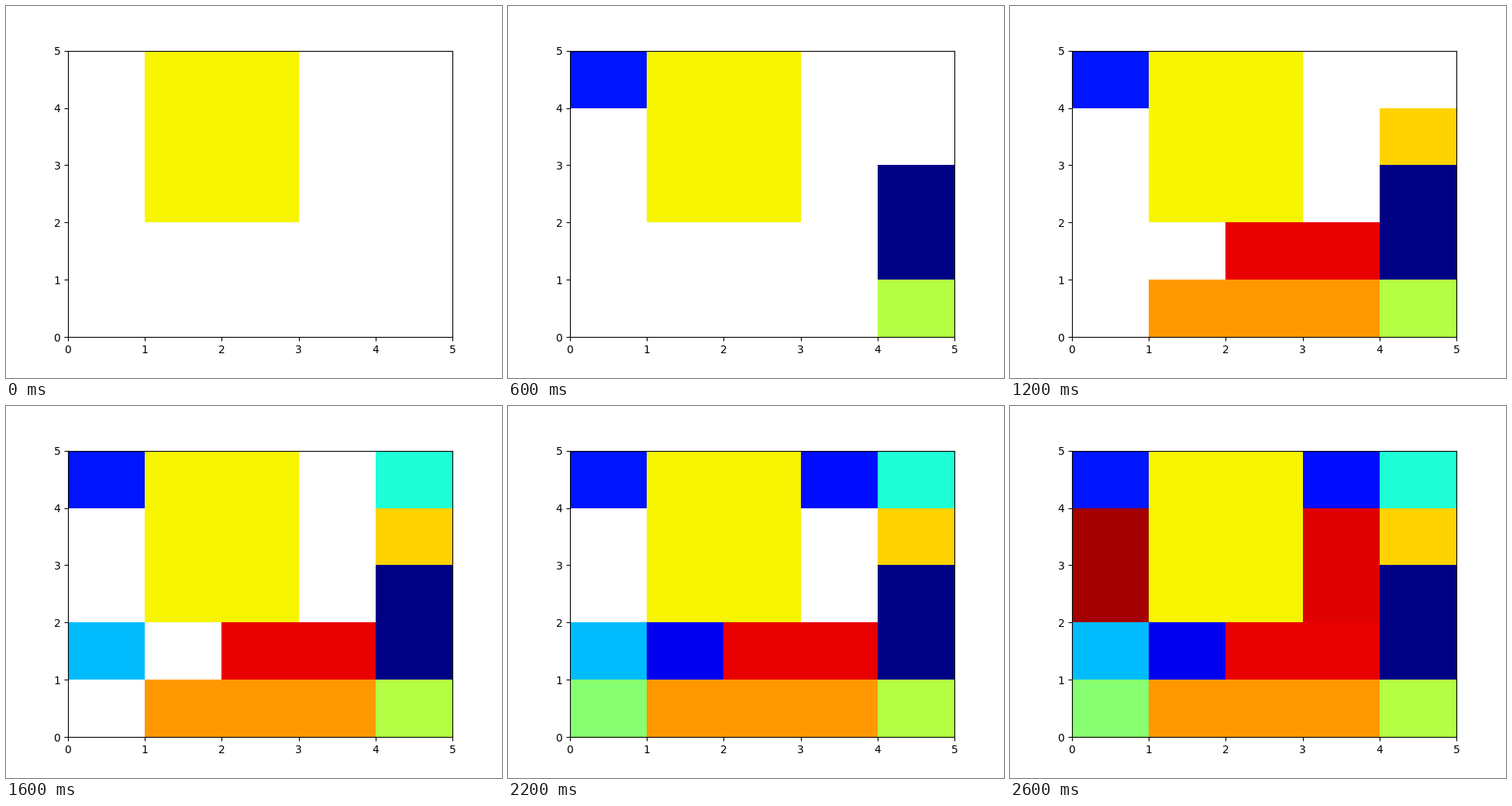
Recreate the animation shown at these times as a matplotlib script. Size 640 by 480 pixels, loop 2800 ms.

```python
import matplotlib.pyplot as plt
from matplotlib.animation import FuncAnimation
from matplotlib.patches import Rectangle

STEP_MS = 200

# x, y, width, height, colour, in order of appearance
TILES = [
    (1, 2, 2, 3, "#f8f500"),
    (4, 0, 1, 1, "#b4ff43"),
    (4, 1, 1, 2, "#000084"),
    (0, 4, 1, 1, "#0014ff"),
    (2, 1, 2, 1, "#e80000"),
    (4, 3, 1, 1, "#ffd300"),
    (1, 0, 3, 1, "#ff9800"),
    (0, 1, 1, 1, "#00bcff"),
    (4, 4, 1, 1, "#1fffd7"),
    (1, 1, 1, 1, "#0000f1"),
    (0, 0, 1, 1, "#87ff70"),
    (3, 4, 1, 1, "#000cff"),
    (0, 2, 1, 2, "#a40000"),
    (3, 2, 1, 2, "#df0000"),
]

fig, ax = plt.subplots(figsize=(6.4, 4.8), dpi=100)
ax.set_xlim(0, 5)
ax.set_ylim(0, 5)

patches = [
    ax.add_patch(Rectangle((x, y), w, h, facecolor=color, edgecolor="none", linewidth=0))
    for x, y, w, h, color in TILES
]


def update(step):
    for i, patch in enumerate(patches):
        patch.set_visible(i <= step)
    return patches


anim = FuncAnimation(fig, update, frames=len(TILES), interval=STEP_MS,
                     repeat=True, repeat_delay=0, blit=False)
plt.show()
```
